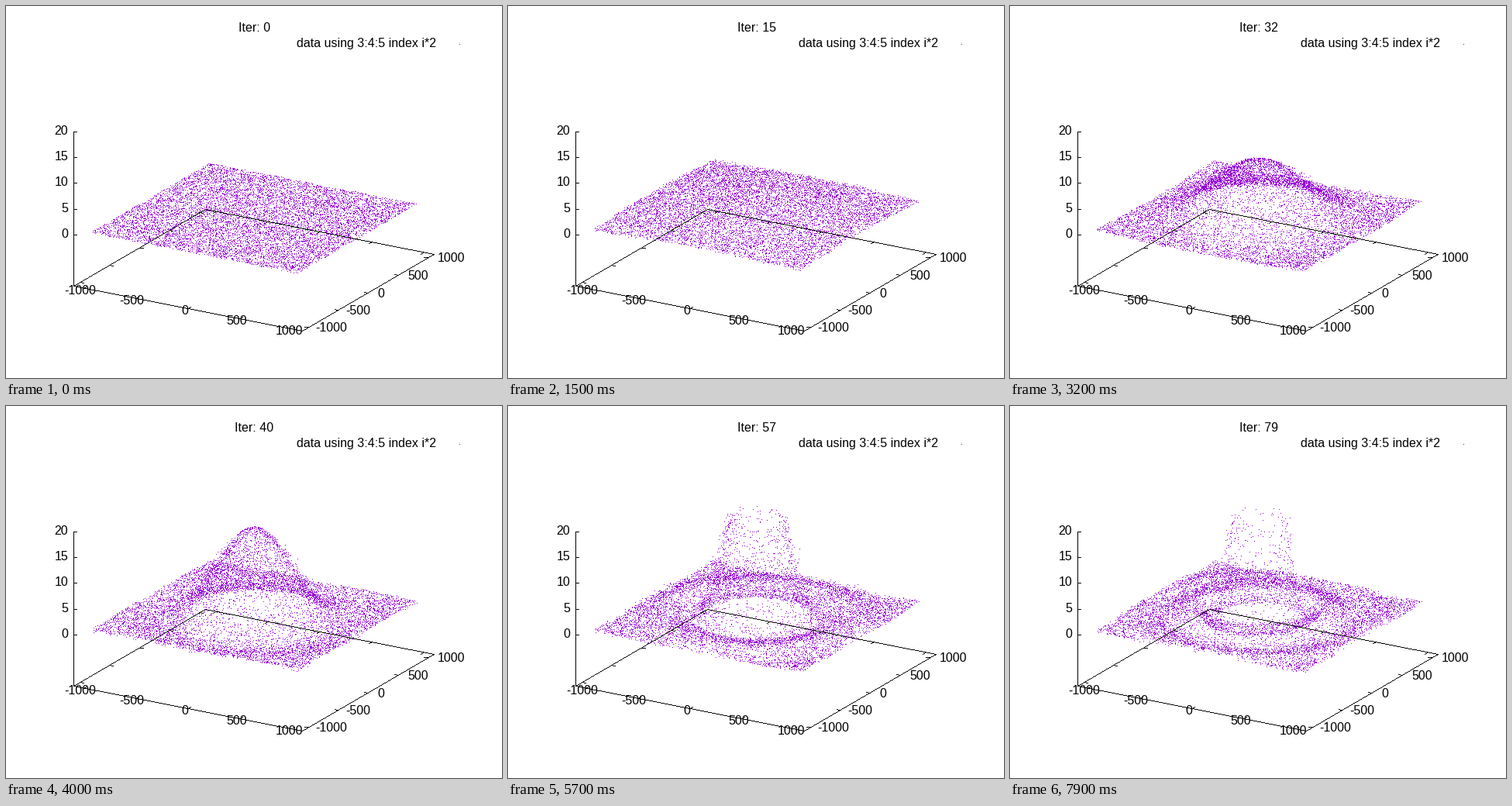
A matplotlib script for the animation above (8000 ms loop, 640 by 480 pixels).

```python
import numpy as np
import matplotlib.pyplot as plt
from matplotlib.animation import FuncAnimation

W, H, DPI = 640, 480, 80
FRAMES, STEP = 80, 100
POINTS, SPAN, LIMIT, ZMAX = 10000, 1000, 1100, 20
FLOOR = -10
PURPLE = "#9400d3"

plt.rcParams["font.family"] = "Liberation Sans"
plt.rcParams["font.size"] = 16 * 72 / DPI

fig = plt.figure(figsize=(W / DPI, H / DPI), dpi=DPI, facecolor="white")
ax = fig.add_axes([0, 0, 1, 1])
ax.set_xlim(0, W)
ax.set_ylim(H, 0)
ax.axis("off")


def project(x, y, z=0.0):
    """Oblique view of the data box, in pixels from the top left."""
    px = 319.5 + (295 * x + 170 * y) / 2200
    py = 274 + (58 * x - 99 * y) / 2200 - 6.65 * z
    return px, py


def snap(x, y):
    """Positions at which the pixel marker fills exactly pixel (x, y)."""
    return np.floor(x), np.floor(y) + 1


def pixels(x, y, color, z):
    return ax.plot(*snap(x, y), ",", color=color, zorder=z)[0]


def line(a, b):
    """One pixel wide line without smoothing."""
    a, b = np.round(a), np.round(b)
    n = int(np.abs(b - a).max()) + 1
    x, y = np.linspace(a, b, n).T
    pixels(x + .5, y + .5, "black", 3)


def label(x, y, text, ha):
    return ax.text(x, y, text, ha=ha, va="baseline", color="black", zorder=4)


def tick(x, y, dx, dy):
    """Tick pointing along (dx, dy) on the floor; returns its root."""
    root = project(x, y, FLOOR)
    line(root, project(x + dx, y + dy, FLOOR))
    return root


def draw_box():
    corners = [(-1, -1), (1, -1), (1, 1), (-1, 1)]
    floor = [project(LIMIT * a, LIMIT * b, FLOOR) for a, b in corners]
    for a, b in zip(floor, floor[1:] + floor[:1]):
        line(a, b)
    line((87, 162), (87, 361))

    for v in range(0, 21, 5):
        y = 295 - 6.65 * v
        line((87, y), (91, y))
        label(80, y + 4, str(v), "right")

    for v in range(-1000, 1001, 500):
        # non-negative numbers keep a blank where the sign would be
        blank = 3 if v >= 0 else 0
        x, y = tick(v, -LIMIT, 0, 50)
        label(x - 5 + blank / 2, y + 8, str(v), "center")
        tick(v, LIMIT, 0, -50)
        x, y = tick(LIMIT, v, -36, 0)
        label(x + 9.7 + blank, y + 6, str(v), "left")
        tick(-LIMIT, v, 36, 0)


draw_box()
title = label(320.5, 33, "Iter: 0", "center")
label(555.3, 53, "data using 3:4:5 index i*2", "right")
pixels([585], [49], PURPLE, 2)
dots = pixels([], [], PURPLE, 2)

rng = np.random.default_rng(7)
x0, y0 = rng.uniform(-SPAN, SPAN, (2, POINTS))
# oscillators under constant push: frequency grows with radius, with some spread
freq = np.hypot(x0, y0) * rng.normal(1, 0.07, POINTS) / 32000


def update(n):
    z = 0.011 * n ** 2 * np.sinc(freq * n) ** 2
    shown = z <= ZMAX
    x, y = project(x0[shown] + 0.15 * n, y0[shown], z[shown])
    dots.set_data(*snap(x, y))
    title.set_text(f"Iter: {n}")
    return dots, title


anim = FuncAnimation(fig, update, frames=FRAMES, interval=STEP,
                     repeat=True, repeat_delay=0)
plt.show()
```
